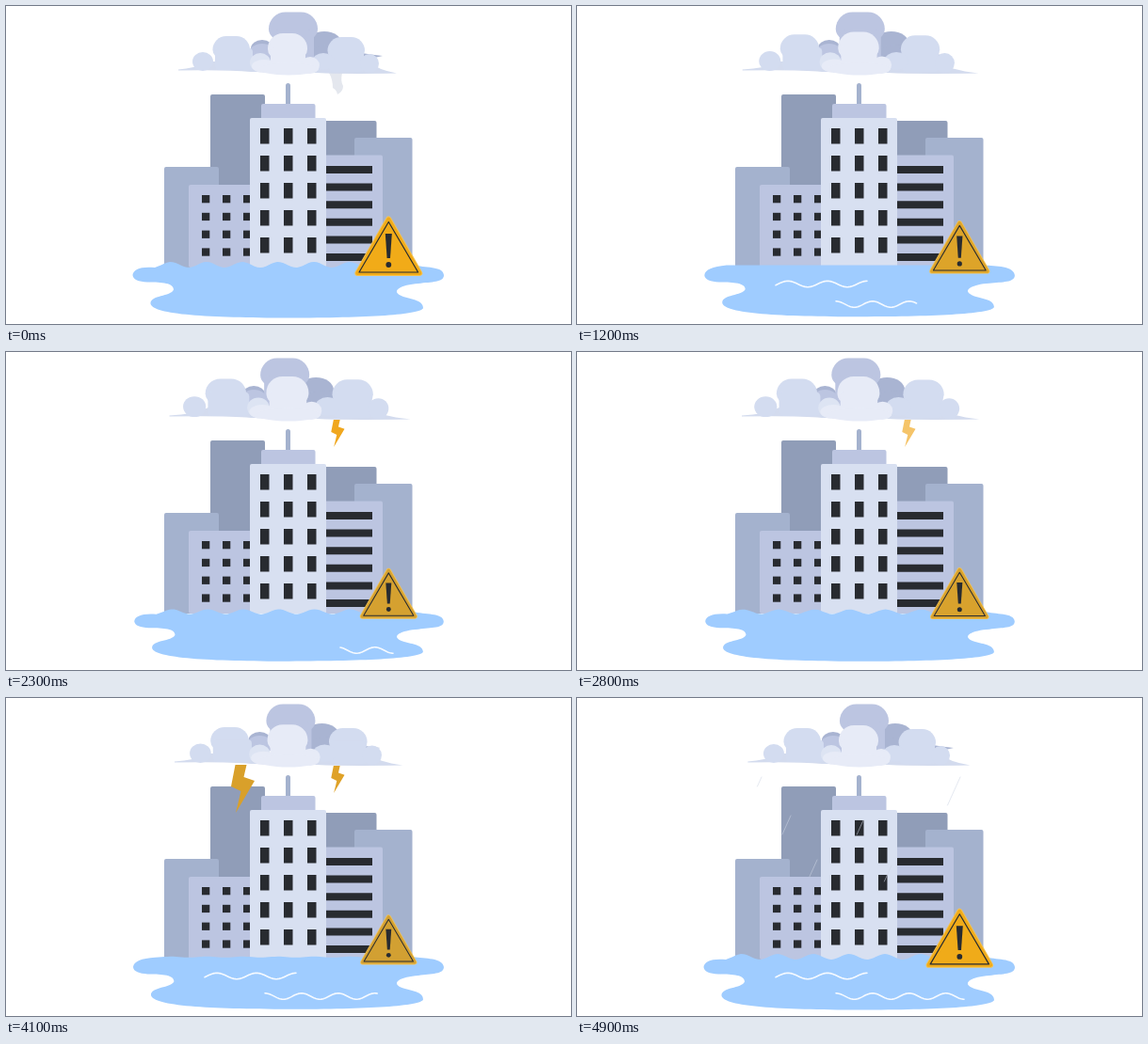
Recreate the animation shown at these times as an HTML page with a canvas. Size 600 by 338 pixels, loop 5 s.

```html
<!DOCTYPE html>
<html lang="en">
<head>
<meta charset="utf-8">
<title>Flooded city</title>
<style>
html, body { margin: 0; width: 100%; height: 100%; overflow: hidden; background: #fff; }
canvas { display: block; }
</style>
</head>
<body>
<canvas id="stage" width="600" height="338"></canvas>
<script>
const ctx = document.getElementById('stage').getContext('2d');
const LOOP = 5000, STEP = 100, TAU = Math.PI * 2;
const INK = '#282b30', DARK = '#909db8', MID = '#a4b2ce', SOFT = '#bcc5e1', PALE = '#d8e0f1';

const clamp = v => Math.max(0, Math.min(1, v));
const ramp = (t, a, b) => clamp((t - a) / (b - a));
const pulse = (t, a, b, c, d) => ramp(t, a, b) * (1 - ramp(t, c, d));
const mix = (a, b, k) => a + (b - a) * k;

function box(color, x, y, x2, y2, r = 0) {
  ctx.fillStyle = color;
  ctx.beginPath();
  ctx.roundRect(x, y, x2 - x, y2 - y, r);
  ctx.fill();
}

function poly(points) {
  ctx.beginPath();
  points.forEach(p => ctx.lineTo(...p));
  ctx.closePath();
}

// Draws around a pivot with a shift and a scale.
function placed(px, py, dx, scale, draw) {
  ctx.save();
  ctx.translate(px + dx, py);
  ctx.scale(scale, scale);
  ctx.translate(-px, -py);
  draw();
  ctx.restore();
}

function puffs(color, ellipses) {
  ctx.fillStyle = color;
  for (const [x, y, rx, ry] of ellipses) {
    ctx.beginPath();
    ctx.ellipse(x, y, rx, ry, 0, 0, TAU);
    ctx.fill();
  }
}

function clouds(t, swell) {
  const spread = t < 1800 ? t / 1800 : 1 - 0.88 * (t - 1800) / 3200;
  const left = 183 - 11 * spread, right = 415 + 17 * spread;

  placed(305, 50, -9 * swell, 1, () => {
    puffs('#a9b4d2', [[338, 41, 19, 14], [350, 50, 28, 9]]);
    ctx.beginPath();
    ctx.moveTo(345, 45);
    ctx.quadraticCurveTo(376, 50, 400, 53);
    ctx.lineTo(370, 60);
    ctx.fill();
    puffs('#a9b4d2', [[272, 45, 12, 9]]);
    box(SOFT, 279, 6.5, 331, 36, [21, 21, 14, 14]);
    box(SOFT, 283, 25, 327, 60, 6);
    puffs(SOFT, [[272, 50, 14, 10]]);
  });

  ctx.fillStyle = '#d3dbee';
  ctx.beginPath();
  ctx.moveTo(left, 67.5);
  ctx.quadraticCurveTo(200, 66.5, 215, 59);
  ctx.lineTo(385, 59);
  ctx.quadraticCurveTo(395, 68, right, 71.5);
  ctx.quadraticCurveTo(360, 72.5, 330, 71);
  ctx.lineTo(260, 70);
  ctx.quadraticCurveTo(235, 67.5, left, 68.5);
  ctx.fill();

  placed(239, 68, -6 * swell, 1 + 0.1 * swell, () => {
    box('#d3dcf0', 219.5, 32, 259, 56, [15, 15, 10, 10]);
    box('#d3dcf0', 222, 45, 262, 68, 4);
    puffs('#d3dcf0', [[209, 59, 11, 10]]);
  });
  placed(361, 70, 7 * swell, 1 + 0.1 * swell, () => {
    box('#d3dcf0', 341.5, 33, 381, 57, [15, 15, 10, 10]);
    box('#d3dcf0', 343, 46, 380, 70, 4);
    puffs('#d3dcf0', [[386, 61, 10, 10], [337, 59, 12, 9]]);
  });
  placed(300, 72, 0, 1 + 0.07 * swell, () => {
    puffs('#dde4f3', [[270, 60, 11, 10]]);
    box('#e7ebf7', 278, 29, 320, 56, [16, 16, 10, 10]);
    box('#e7ebf7', 281, 44, 318, 70, 4);
    puffs('#e7ebf7', [[274, 64, 13, 7], [323, 63, 10, 9], [300, 67, 32, 6.5]]);
  });
}

function city() {
  box(DARK, 217, 94, 275, 278, 2);
  box(MID, 168, 171, 226, 278, 2);
  box(SOFT, 194, 190, 262, 278, 2);
  box(DARK, 338, 122, 393.5, 278, 2);
  box(MID, 370, 140, 431.5, 278, 2);
  box(SOFT, 338, 158.5, 400, 278, 2);
  for (let i = 0; i < 6; i++) box(INK, 340, 170 + i * 18.6, 389, 178 + i * 18.6);
  for (let r = 0; r < 4; r++)
    for (let c = 0; c < 3; c++)
      box(INK, 208 + c * 22, 201 + r * 18.8, 216.3 + c * 22, 209.3 + r * 18.8);
  box(MID, 297, 82, 302, 108, 2.5);
  box(SOFT, 271, 104, 328.5, 122, 2);
  box(PALE, 259, 119, 340, 278, 2);
  for (let r = 0; r < 5; r++)
    for (let c = 0; c < 3; c++)
      box(INK, 270 + c * 25, 130 + r * 29, 279.5 + c * 25, 146.5 + r * 29);
}

function bolt(x, y, scale, alpha, color, reach = 1) {
  if (alpha <= 0) return;
  ctx.save();
  ctx.globalAlpha = alpha;
  ctx.translate(x, y);
  ctx.scale(scale, scale);
  ctx.beginPath();
  ctx.rect(-5, -2, 40, 54 * reach);
  ctx.clip();
  poly([[5, 0], [17, 0], [14, 13], [25.5, 17], [5.5, 51], [11, 28], [0.5, 23]]);
  ctx.fillStyle = color;
  ctx.fill();
  ctx.restore();
}

function wisp(alpha) {
  if (alpha <= 0) return;
  ctx.globalAlpha = alpha;
  ctx.fillStyle = '#e4e7ee';
  ctx.beginPath();
  ctx.moveTo(343, 71);
  ctx.lineTo(357, 71);
  ctx.quadraticCurveTo(355, 80, 358, 85);
  ctx.quadraticCurveTo(358, 91, 352, 94);
  ctx.quadraticCurveTo(351, 89, 347, 87);
  ctx.quadraticCurveTo(347, 78, 343, 71);
  ctx.fill();
  ctx.globalAlpha = 1;
}

const drops = [[227, 125, 20], [255, 172, 18], [304, 130, 15], [334, 178, 17], [407, 84, 30], [196, 84, 10]];

function rain(t) {
  for (const start of [1300, 4500]) {
    const age = t - start;
    const alpha = pulse(age, 0, 200, 600, 800);
    if (!alpha) continue;
    const fall = (age - 400) * 0.22;
    ctx.strokeStyle = `rgba(205, 213, 228, ${0.6 * alpha})`;
    ctx.lineWidth = 0.9;
    for (const [x, y, len] of drops) {
      const sx = x - fall * 0.45, sy = y + fall;
      if (sy < 76) continue;
      ctx.beginPath();
      ctx.moveTo(sx, sy);
      ctx.lineTo(sx - len * 0.45, sy + len);
      ctx.stroke();
    }
  }
}

function water(t, swell) {
  const chop = 3 * (0.5 + 0.5 * Math.cos(TAU * t / 2500));
  ctx.save();
  ctx.translate(430, 290);
  ctx.scale(1 - 0.006 * swell, 1 - 0.07 * swell);
  ctx.translate(-430, -290);
  ctx.fillStyle = '#9fccff';
  ctx.beginPath();
  ctx.moveTo(134.5, 286);
  ctx.bezierCurveTo(135, 280, 143, 276.5, 158, 278 - (3 - chop));
  for (let x = 165; x <= 432; x += 3)
    ctx.lineTo(x, 275 - chop * Math.cos(TAU * (x - 175) / 38));
  ctx.bezierCurveTo(445, 276 + chop, 464, 276, 465, 286);
  ctx.bezierCurveTo(465, 294, 452, 293, 438, 295);
  ctx.bezierCurveTo(420, 296, 406, 303, 422, 309);
  ctx.bezierCurveTo(432, 312, 443, 313, 443, 321);
  ctx.bezierCurveTo(441, 328, 385, 331.5, 300, 331.5);
  ctx.bezierCurveTo(215, 331.5, 156, 328, 153.5, 316.5);
  ctx.bezierCurveTo(153, 307, 175, 309, 178, 301.5);
  ctx.bezierCurveTo(178, 293, 161, 294, 150, 293.5);
  ctx.bezierCurveTo(141, 293, 135, 291, 134.5, 286);
  ctx.fill();
  ctx.restore();
}

function ripple(x1, x2, from, to, y, crest, period) {
  const a = mix(x1, x2, from), b = mix(x1, x2, to);
  if (b <= a) return;
  const at = x => y - 3.2 * Math.cos(TAU * (x - crest) / period);
  ctx.beginPath();
  for (let x = a; x < b; x += 1) ctx.lineTo(x, at(x));
  ctx.lineTo(b, at(b));
  ctx.stroke();
}

function ripples(t) {
  const first = t < 2700;
  ctx.strokeStyle = '#f6faff';
  ctx.lineWidth = 1.6;
  ctx.lineCap = 'round';
  ripple(211, 308, first ? ramp(t, 1300, 2250) : 0,
    first ? ramp(t, 0, 930) : ramp(t, 2800, 3540), 295.5, 224, 42);
  ripple(275, 411, first ? ramp(t, 1800, 2650) : 0,
    first ? ramp(t, 640, 1530) : ramp(t, 3320, 4210), 317, 275, 38.9);
}

function warning(t) {
  const beat = 0.5 + 0.5 * Math.cos(TAU * t * 3 / LOOP);
  const width = 60 + beat * (10 + 2 * Math.cos(TAU * t / LOOP));
  const k = (width - 60) / 12;
  const tone = `rgb(${mix(210, 241, k)}, ${mix(160, 171, k)}, ${mix(50, 24, k)})`;
  placed(406.3, 265, 0, width / 72, () => {
    ctx.lineJoin = 'round';
    poly([[406.3, 226.5], [439.3, 284], [373.3, 284]]);
    ctx.strokeStyle = '#f3c253';
    ctx.lineWidth = 6;
    ctx.stroke();
    ctx.strokeStyle = ctx.fillStyle = tone;
    ctx.lineWidth = 4;
    ctx.stroke();
    ctx.fill();
    poly([[406.3, 229.5], [437.6, 283], [375, 283]]);
    ctx.strokeStyle = INK;
    ctx.lineWidth = 1.2;
    ctx.stroke();
    ctx.fillStyle = INK;
    poly([[402.8, 242], [409.8, 242], [408, 268], [404.6, 268]]);
    ctx.fill();
    puffs(INK, [[406.3, 275, 2.9, 2.9]]);
  });
}

function draw(t) {
  const swell = 0.5 - 0.5 * Math.cos(TAU * t / LOOP);
  ctx.fillStyle = '#fff';
  ctx.fillRect(0, 0, 600, 338);
  city();
  rain(t);
  wisp(Math.max(1 - ramp(t, 800, 1100), pulse(t, 3100, 3300, 3600, 3800)));
  bolt(238.5, 71, 1, pulse(t, 350, 600, 900, 1200), '#cf9d30');
  bolt(238.5, 71, 1, 0.85 * ramp(t, 3300, 3500) * (1 - ramp(t, 4300, 4600)) + 0.15 * pulse(t, 3500, 3900, 4200, 4400),
    '#d9a02a', mix(0.85, 1, ramp(t, 3500, 3800)));
  bolt(345, 72, 0.57, pulse(t, 1300, 1500, 2600, 3200), '#f0a71e');
  bolt(345, 72, 0.57, pulse(t, 3700, 3900, 4300, 4600), '#dfa228');
  clouds(t, swell);
  water(t, swell);
  ripples(t);
  warning(t);
}

function tick() {
  const t = performance.now() % LOOP;
  draw(Math.floor(t / STEP) * STEP);
  requestAnimationFrame(tick);
}
tick();
</script>
</body>
</html>
```
